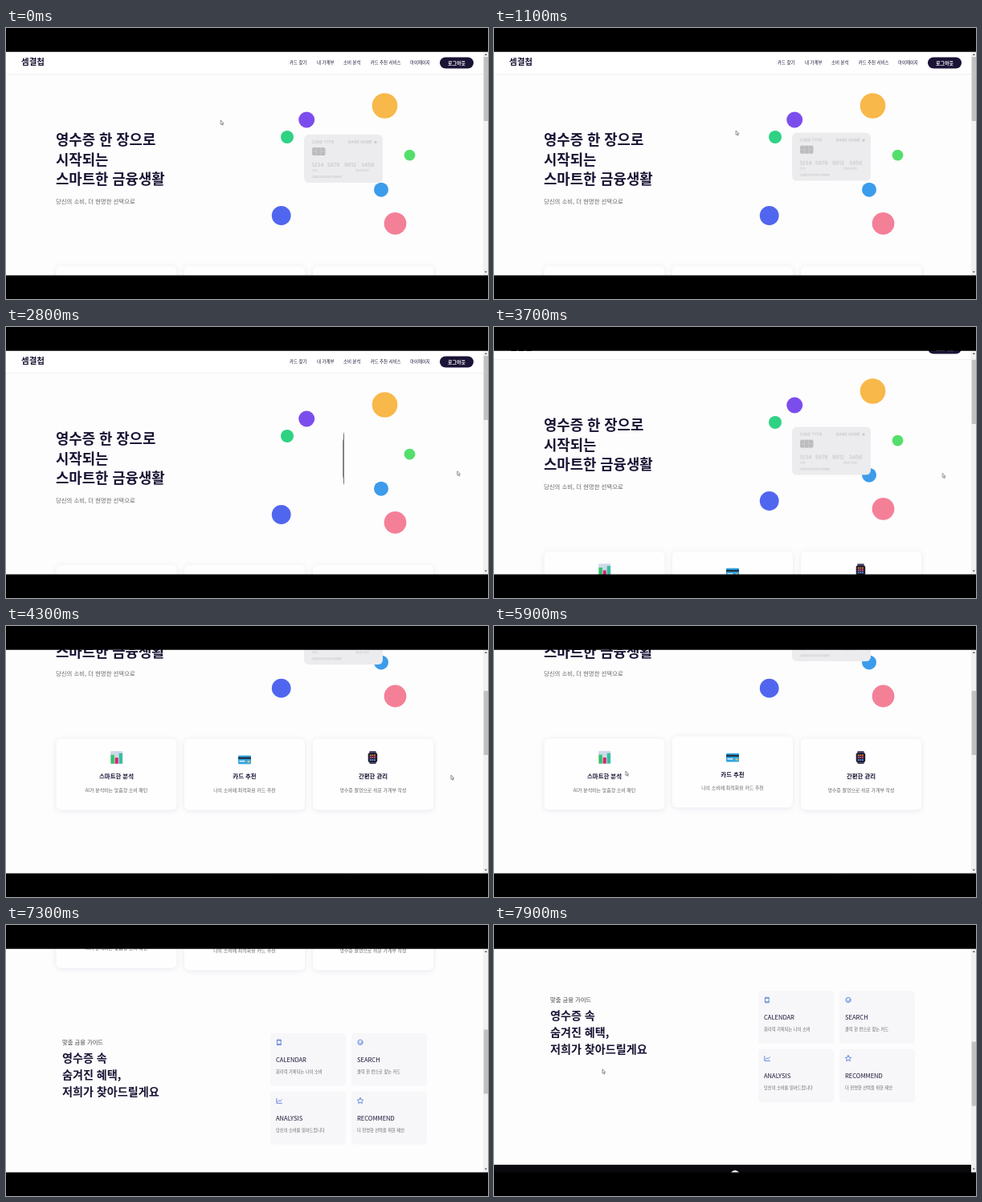
An HTML page for the animation above (8 s loop, 600 px wide and 338 px high).

```html
<!DOCTYPE html>
<html lang="ko">
<head>
<meta charset="utf-8">
<title>가계부 서비스</title>
<style>
html, body { margin: 0; width: 100%; height: 100%; overflow: hidden; background: #000; }
body { font-family: "Noto Sans CJK KR", "Noto Sans CJK", "Noto Sans", sans-serif; }
svg { position: absolute; left: 0; top: 0; display: block; overflow: visible; }
#stage { position: absolute; left: 0; top: 0; width: 600px; height: 338px; overflow: hidden; background: #fdfdfe; }
#page { position: absolute; inset: 0; }
#page, #thumb, #cursor, .feature, #float, #flip, .shape { animation: 8s linear infinite; }

/* scrolling: page and thumb share one track */
#page { --k: -1; animation-name: scroll; }
#thumb { --k: .287; animation-name: scroll; }
@keyframes scroll {
  0%, 44.4% { transform: translateY(0); animation-timing-function: ease-in-out; }
  52.5%, 82.5% { transform: translateY(calc(var(--k) * 156.3px)); }
  82.5% { animation-timing-function: cubic-bezier(.4, .15, .75, .8); }
  91.25% { transform: translateY(calc(var(--k) * 329px)); animation-timing-function: cubic-bezier(.25, .5, .6, 1); }
  98.75%, 100% { transform: translateY(calc(var(--k) * 382px)); }
}

/* payment card */
#float { position: absolute; left: 371px; top: 133px; width: 98px; height: 60px; perspective: 470px; animation-name: float; }
@keyframes float {
  0% { transform: translateY(0); animation-timing-function: ease-out; }
  16% { transform: translateY(-2.4px); animation-timing-function: ease-in; }
  22.5% { transform: translateY(-2px); animation-timing-function: ease-in; }
  35% { transform: translateY(1.2px); animation-timing-function: ease-out; }
  57.5% { transform: translateY(12px); animation-timing-function: ease-in; }
  73.75% { transform: translateY(7.5px); }
  100% { transform: translateY(-3px); }
}
#flip { position: absolute; inset: 0; transform-style: preserve-3d; animation-name: flip; }
@keyframes flip {
  0%, 17% { transform: rotateY(0deg); animation-timing-function: ease-in; }
  22.5% { transform: rotateY(91deg); animation-timing-function: ease-out; }
  28%, 30% { transform: rotateY(170deg); animation-timing-function: ease-in; }
  35% { transform: rotateY(91deg); animation-timing-function: ease-out; }
  40.5%, 100% { transform: rotateY(0deg); }
}
.face { position: absolute; inset: 0; border-radius: 6px; backface-visibility: hidden; background: #ececee; }
.back { background: #1f1f26; transform: rotateY(180deg); }
.face text { font-family: Inter, Roboto, sans-serif; font-weight: 600; fill: #cacacd; }

/* feature cards */
.panel { fill: #fefefe; filter: drop-shadow(0 1px 3px rgba(40, 40, 90, .1)); }
.feature { animation-timing-function: ease; }
#f1 { animation-name: lift1; }
#f2 { animation-name: lift2; }
#f3 { animation-name: lift3; }
@keyframes lift1 { 0%, 73.5% { transform: translateY(0); } 77.5%, 91% { transform: translateY(-3px); } 95%, 100% { transform: translateY(0); } }
@keyframes lift2 { 0%, 65% { transform: translateY(0); } 69%, 73.5% { transform: translateY(-3px); } 77.5%, 100% { transform: translateY(0); } }
@keyframes lift3 { 0%, 58.5% { transform: translateY(0); } 62.5%, 64% { transform: translateY(-3px); } 67.5%, 100% { transform: translateY(0); } }

/* text */
.ink { fill: #1a1333; font-weight: 700; }
.h1 { font-size: 17.75px; }
.h2 { font-size: 14.1px; }
.h3 { font-size: 7.4px; }
.nav { font-size: 5.4px; font-weight: 500; fill: #1a1333; }
.mid { text-anchor: middle; }
.name { font-size: 7.55px; font-weight: 500; fill: #1a1333; }
.note { font-size: 5.95px; fill: #666; }
.tiny { font-size: 5.26px; fill: #666; }
.tile { fill: #f7f7fa; }
.line { fill: none; stroke: #5b80d6; stroke-width: .9; stroke-linejoin: round; stroke-linecap: round; }

/* pointer */
#cursor { animation-name: move; animation-timing-function: ease-in-out; }
@keyframes move {
  0%, 10.5% { transform: translate(267.3px, 115px); }
  19.5%, 22.5% { transform: translate(391px, 162px); }
  27.5% { transform: translate(400px, 166px); animation-timing-function: ease-in; }
  30% { transform: translate(469px, 172px); animation-timing-function: ease-out; }
  33% { transform: translate(576px, 181px); }
  35%, 43% { transform: translate(561.7px, 179.6px); }
  50%, 56.5% { transform: translate(554px, 186px); animation-timing-function: ease-in; }
  60.5% { transform: translate(490px, 188px); animation-timing-function: linear; }
  65% { transform: translate(368px, 190px); animation-timing-function: linear; }
  70% { transform: translate(278px, 188px); animation-timing-function: linear; }
  73.75% { transform: translate(164px, 181px); animation-timing-function: ease-out; }
  79%, 91.25% { transform: translate(137px, 182px); }
  98.75%, 100% { transform: translate(135px, 179.7px); }
}
.shape { fill: #fff; stroke: #555; stroke-width: .65; stroke-linejoin: round; }
#arrow { animation-name: arrow; }
#hand { animation-name: hand; }
#beam { animation-name: beam; fill: none; }
#arrow, #hand, #beam { animation-timing-function: step-end; }
@keyframes arrow { 0% { opacity: 1; } 17.3% { opacity: 0; } 30% { opacity: 1; } 90% { opacity: 0; } 95%, 100% { opacity: 1; } }
@keyframes hand { 0% { opacity: 0; } 17.3% { opacity: 1; } 30%, 100% { opacity: 0; } }
@keyframes beam { 0% { opacity: 0; } 90% { opacity: 1; } 95%, 100% { opacity: 0; } }
</style>
</head>
<body>
<div id="stage">
  <div id="page">
    <svg width="600" height="338">
      <rect y="29" width="594" height="28" fill="#fff"/>
      <rect y="57" width="594" height=".7" fill="#ececf0"/>
      <text class="ink" x="19" y="46.3" font-size="10.5">셈결첩</text>
      <g class="nav">
        <text x="353" y="45.2">카드 찾기</text>
        <text x="387" y="45.2">내 가계부</text>
        <text x="420" y="45.2">소비 분석</text>
        <text x="453.7" y="45.2">카드 추천 서비스</text>
        <text x="503" y="45.2">마이페이지</text>
      </g>
      <rect x="540" y="36.5" width="42" height="14" rx="7" fill="#1b1336"/>
      <text class="mid" x="561" y="45.7" font-size="6" font-weight="700" fill="#fff">로그아웃</text>

      <g class="ink h1">
        <text x="62" y="146.3">영수증 한 장으로</text>
        <text x="62" y="170.8">시작되는</text>
        <text x="62" y="195.3">스마트한 금융생활</text>
      </g>
      <text x="62" y="218.8" font-size="7.4" fill="#666">당신의 소비, 더 현명한 선택으로</text>

      <circle cx="471.5" cy="97" r="15.8" fill="#f8b84a"/>
      <circle cx="374.2" cy="114.5" r="10" fill="#7c4ded"/>
      <circle cx="350" cy="136" r="8" fill="#2fd283"/>
      <circle cx="502.5" cy="158.6" r="6.9" fill="#54df6a"/>
      <circle cx="467" cy="201.7" r="9" fill="#3c9ceb"/>
      <circle cx="342.7" cy="234" r="11.9" fill="#5066ee"/>
      <circle cx="484.5" cy="243.8" r="13.9" fill="#f48098"/>

      <g class="feature" id="f1">
        <rect class="panel" x="62.5" y="296.7" width="150" height="89" rx="6"/>
        <rect x="130" y="312.3" width="15.4" height="16" rx="1.5" fill="#cfd9e8"/>
        <path d="M130.5 317h4.300v11h-4.300z" fill="#2fc765"/>
        <path d="M135.700 320.500h4v7.500h-4z" fill="#dc1f70"/>
        <path d="M140.700 315h4.200v13h-4.200z" fill="#35bfa0"/>
        <text class="ink h3 mid" x="137.5" y="346.800">스마트한 분석</text>
        <text class="note mid" x="137.5" y="363.100">AI가 분석하는 맞춤형 소비 패턴</text>
      </g>
      <g class="feature" id="f2">
        <rect class="panel" x="222" y="296.7" width="150" height="89" rx="6"/>
        <rect x="289" y="317.800" width="16" height="10.800" rx="1.300" fill="#31a5e4"/>
        <path d="M289 319.800h16v2.400h-16z" fill="#20333f"/>
        <path d="M290.500 324.200h7v1.500h-7z" fill="#e6f2f8"/>
        <path d="M300.500 324.200h3v2.600h-3z" fill="#d9c46a"/>
        <text class="ink h3 mid" x="297" y="346.800">카드 추천</text>
        <text class="note mid" x="297" y="363.100">나의 소비에 최적화된 카드 추천</text>
      </g>
      <g class="feature" id="f3">
        <rect class="panel" x="382" y="296.7" width="150" height="89" rx="6"/>
        <rect x="452.300" y="312.300" width="8.400" height="16" rx="1" fill="#4a4668"/>
        <rect x="450.700" y="314.500" width="11.500" height="11.800" rx="2" fill="#211d2e"/>
        <g stroke-width="1.800" stroke-dasharray="1.800 .8">
          <path d="M452.800 317.600h7.200" stroke="#f08a3c"/>
          <path d="M452.800 320.500h7.200" stroke="#e04f9a"/>
          <path d="M452.800 323.400h7.200" stroke="#4aa3ee"/>
        </g>
        <text class="ink h3 mid" x="457" y="346.800">간편한 관리</text>
        <text class="note mid" x="457" y="363.100">영수증 촬영으로 쉬운 가계부 작성</text>
      </g>

      <text x="70" y="477.700" font-size="7.300" font-weight="500" fill="#444">맞춤 금융 가이드</text>
      <g class="ink h2">
        <text x="70" y="500.200">영수증 속</text>
        <text x="70" y="521.200">숨겨진 혜택,</text>
        <text x="70" y="542.200">저희가 찾아드릴게요</text>
      </g>

      <g>
        <rect class="tile" x="329" y="464" width="94" height="66" rx="4"/>
        <path class="line" d="M337.800 472.300h4.400v6.600h-4.400zM337.800 473.300h4.400M337.800 477.700h4.400"/>
        <text class="name" x="336" y="499.800">CALENDAR</text>
        <text class="tiny" x="336" y="514">휘리릭 기록되는 나의 소비</text>
      </g>
      <g>
        <rect class="tile" x="430" y="464" width="94" height="66" rx="4"/>
        <circle class="line" cx="441" cy="475.500" r="3.200"/>
        <path class="line" d="M439.700 474.500v.1M442.300 474.500v.1M439.300 476.300q1.700 1.900 3.400 0"/>
        <text class="name" x="437" y="499.800">SEARCH</text>
        <text class="tiny" x="437" y="514">클릭 한 번으로 찾는 카드</text>
      </g>
      <g>
        <rect class="tile" x="329" y="536.500" width="94" height="66.500" rx="4"/>
        <path class="line" d="M336.800 545.500v6h6.600M338 549.800l1.700-2 1.500 1.200 2.200-2"/>
        <text class="name" x="336" y="572.800">ANALYSIS</text>
        <text class="tiny" x="336" y="587">당신의 소비를 읽어드립니다</text>
      </g>
      <g>
        <rect class="tile" x="430" y="536.500" width="94" height="66.500" rx="4"/>
        <path class="line" d="M441 544.600l1.100 2.400 2.600.3-1.900 1.800.5 2.600-2.300-1.300-2.300 1.300.5-2.600-1.900-1.800 2.600-.3z"/>
        <text class="name" x="437" y="572.800">RECOMMEND</text>
        <text class="tiny" x="437" y="587">더 현명한 선택을 위한 제안</text>
      </g>

      <rect y="681" width="594" height="60" fill="#0a0a0e"/>
      <circle cx="300" cy="693.700" r="5.700" fill="#fff"/>
    </svg>

    <div id="float"><div id="flip">
      <div class="face">
        <svg width="98" height="60">
          <text x="9.500" y="11" font-size="4.900">CARD TYPE</text>
          <text x="55" y="11" font-size="4.900">BANK NAME</text>
          <circle cx="89" cy="9.300" r="1.600" fill="#cacacd"/>
          <rect x="10" y="16" width="16.500" height="10" rx="2" fill="#bcbcbf"/>
          <path d="M10 21h5.500M21 21h5.500M15.500 16v10M21 16v10" stroke="#d4d4d6" stroke-width=".6"/>
          <g font-size="6.400">
            <text x="9.500" y="39.500">1234</text>
            <text x="29" y="39.500">5678</text>
            <text x="50" y="39.500">9012</text>
            <text x="71" y="39.500">3456</text>
          </g>
          <text x="10" y="45.500" font-size="2.800">1234</text>
          <text x="64" y="46" font-size="2.800">VALID 01/80</text>
          <text x="9.500" y="53.500" font-size="3.700">CARDHOLDER NAME</text>
        </svg>
      </div>
      <div class="face back"></div>
    </div></div>
  </div>

  <svg width="600" height="338">
    <rect x="594" y="29" width="6" height="280" fill="#f1f1f1"/>
    <rect id="thumb" x="594.700" y="36" width="5.300" height="80" fill="#c1c1c1"/>
    <path d="M595.700 34l1.600-2 1.600 2zM595.700 303.500l1.600 2 1.600-2z" fill="#505050"/>
    <g id="cursor">
      <path class="shape" id="arrow" d="M0 0v5.300l1.200-1 .9 1.900.9-.4-.9-1.800h1.700z"/>
      <path class="shape" id="hand" d="M0 .6q.7-.9 1.300 0v2.500l3 .7q.9.400.7 1.500l-.6 2.700h-3.700l-2.300-3q.1-1 1.600.1z"/>
      <path class="shape" id="beam" d="M-1.300 0q1.300 0 1.300.8v6.400q0 .8-1.300.8M1.300 0q-1.300 0-1.300.8M0 7.200q0 .8 1.300.8"/>
    </g>
    <!-- letterbox -->
    <path d="M0 0h600v29.800h-600zM0 308.400h600v29.600h-600z"/>
  </svg>
</div>
</body>
</html>
```
